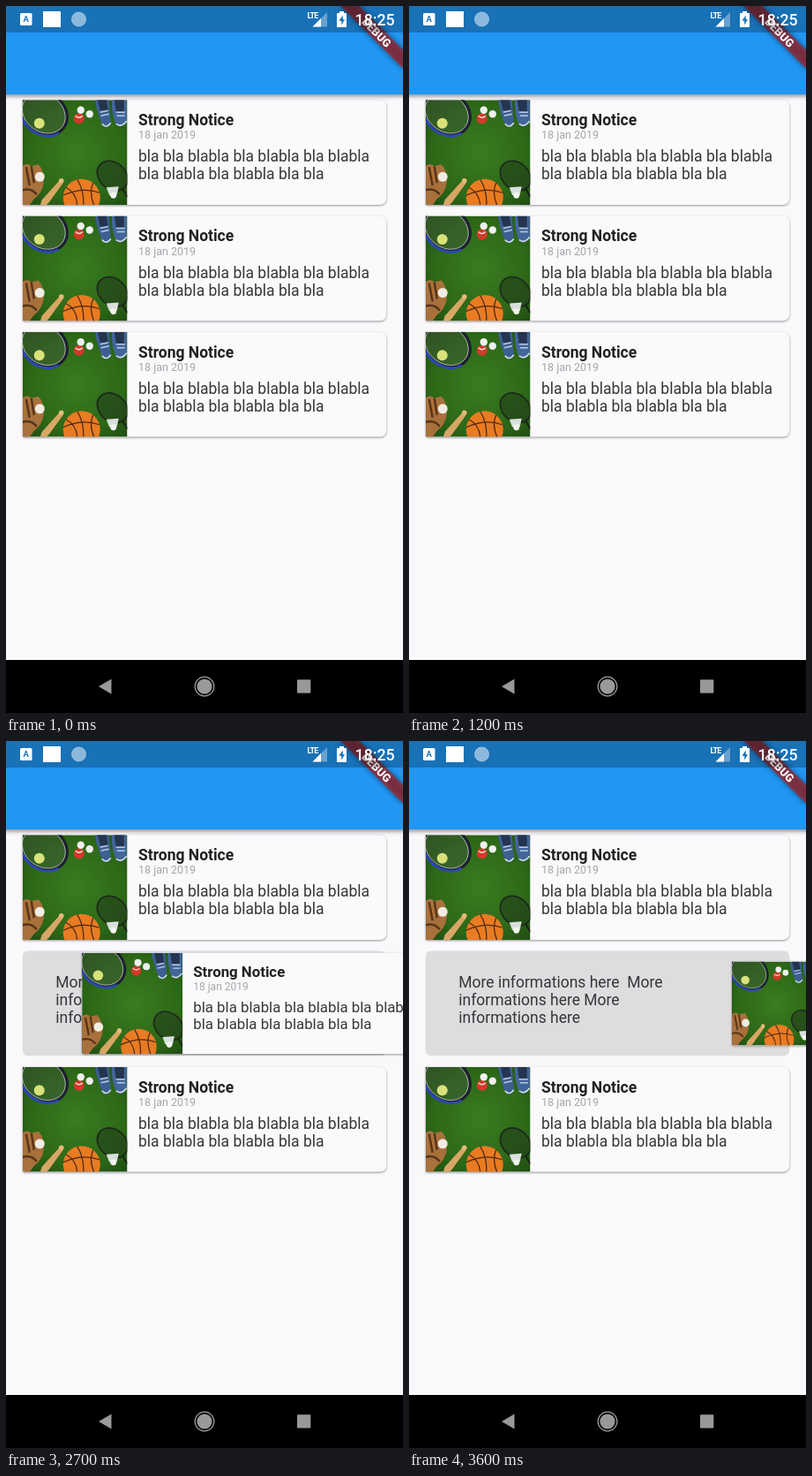
These frames come from a looping animation (450x800 px, 10 s). An HTML page:

```html
<!DOCTYPE html>
<html lang="en">
<head>
<meta charset="utf-8">
<title>Sliding notice cards</title>
<style>
  html, body { margin: 0; width: 100%; height: 100%; overflow: hidden; background: #faf8fb; }
  svg { display: block; width: 450px; height: 800px; font-family: Roboto, Arial, sans-serif; }
  text { white-space: pre; }
  .sheet { fill: #fbf9fc; filter: drop-shadow(0 1.5px 1.2px rgba(0, 0, 0, .42)); }
  .bar { fill: #2196f3; filter: drop-shadow(0 2px 2.5px rgba(0, 0, 0, .46)); }
  .ribbon { fill: #b71c1c; fill-opacity: .63; }
  .ribbon-shadow { filter: blur(3px); fill: #000; fill-opacity: .5; }
  .title { font-size: 17.5px; font-weight: 700; fill: #212122; }
  .date { font-size: 12.5px; fill: #a6a5a8; }
  .body { font-size: 17.5px; fill: #363538; }
</style>
</head>
<body>
<svg viewBox="0 0 450 800">
  <defs>
    <radialGradient id="grass" cx=".52" cy=".5" r=".75">
      <stop offset="0" stop-color="#397c20"/>
      <stop offset=".6" stop-color="#2d6817"/>
      <stop offset="1" stop-color="#1b4710"/>
    </radialGradient>
    <clipPath id="crop"><path d="M0 0H118.75V118.75H2Q0 118.75 0 116.75Z"/></clipPath>

    <g id="photo" clip-path="url(#crop)">
      <rect width="119" height="119" fill="url(#grass)"/>
      <!-- tennis racket and balls -->
      <g transform="translate(24 15) rotate(35)">
        <ellipse rx="28" ry="23" fill="#3c5a34" fill-opacity=".55" stroke="#1d2030" stroke-width="3.4"/>
        <path d="M27 9A28 23 0 0 1 -16 19" fill="none" stroke="#2b48b4" stroke-width="2.8"/>
        <ellipse rx="26" ry="21" fill="none" stroke="#c9ccd0" stroke-width=".7"/>
      </g>
      <circle cx="19" cy="26.5" r="6" fill="#d9e27a"/>
      <circle cx="64" cy="21" r="6" fill="#d33a28"/>
      <path d="M60 18Q64 22 68 18" fill="none" stroke="#f2ded6" stroke-width="1.3"/>
      <circle cx="66" cy="11.5" r="4.2" fill="#eef0ee"/>
      <circle cx="76" cy="16" r="4.2" fill="#eef0ee"/>
      <!-- shoes -->
      <path d="M82 0H98Q99 16 100 26Q98 32 92 30Q86 22 82 0Z" fill="#3d5f92"/>
      <path d="M101 0H118V24Q115 32 107 29Q101 20 101 0Z" fill="#42669b"/>
      <path d="M85 0H95L97 12H88ZM104 0H115V13H106Z" fill="#25344f"/>
      <path d="M88 14L97 12M89 18L98 16M106 14H116M107 18H116" stroke="#b9cbe2" stroke-width="1.4"/>
      <path d="M90 27Q95 33 100 26M106 27Q112 32 118 24" fill="none" stroke="#d4dde8" stroke-width="1.6"/>
      <!-- glove, ball and bat -->
      <path d="M0 75Q5 70 10 75L18 73Q25 80 24 94Q22 106 13 112L8 119H0Z" fill="#a8713b"/>
      <path d="M4 76L8 97M10 75L13 94M0 102Q10 99 16 107" fill="none" stroke="#56331a" stroke-width="2.4"/>
      <circle cx="19.5" cy="87" r="5.5" fill="#f1ece3"/>
      <path d="M42 91L46 94L30 116L27 119H20L22 113Z" fill="#d8a765"/>
      <circle cx="44" cy="91.5" r="2.8" fill="#e6bb7c"/>
      <!-- basketball -->
      <circle cx="67" cy="110.5" r="21" fill="#e97b22"/>
      <path d="M46 108Q68 98 87 105M62 90Q70 103 69 119M49 99Q61 105 62 119M80 94Q75 105 81 119" fill="none" stroke="#4d2a14" stroke-width="1.3"/>
      <!-- badminton racket and shuttlecock -->
      <ellipse cx="102" cy="86" rx="19" ry="15" transform="rotate(42 102 86)" fill="#243f1c" fill-opacity=".6" stroke="#1c2a1c" stroke-width="1.8"/>
      <path d="M113 100L119 110" stroke="#1b211b" stroke-width="2"/>
      <path d="M95 99L109 98L107 107Q103 112 98 107Z" fill="#d8dfdc"/>
      <circle cx="103" cy="108" r="3.4" fill="#f3f4ef"/>
    </g>

    <g id="card">
      <path class="sheet" d="M0 0H404.5Q412.5 0 412.5 8V110.75Q412.5 118.75 404.5 118.75H2Q0 118.75 0 116.75Z"/>
      <use href="#photo"/>
      <text class="title" x="131.25" y="28.75">Strong Notice</text>
      <text class="date" x="131.25" y="44">18 jan 2019</text>
      <text class="body" x="131.25" y="70">bla bla blabla bla blabla bla blabla</text>
      <text class="body" x="131.25" y="90">bla blabla bla blabla bla bla</text>
    </g>
  </defs>

  <rect width="450" height="800" fill="#faf8fb"/>

  <use href="#card" x="18.75" y="106.25"/>
  <use href="#card" x="18.75" y="368.75"/>
  <g id="details">
    <rect x="18.75" y="237.5" width="412.5" height="118.75" rx="6.25" fill="#dedcdf"/>
    <text class="body" x="56.25" y="278.6">More informations here  More</text>
    <text class="body" x="56.25" y="298.6">informations here More</text>
    <text class="body" x="56.25" y="318.6">informations here</text>
  </g>
  <use id="slider" href="#card"/>

  <rect class="bar" x="-10" y="-10" width="470" height="110"/>

  <g transform="translate(450 0) rotate(45)">
    <rect class="ribbon-shadow" x="-50" y="35" width="100" height="15"/>
    <rect class="ribbon" x="-50" y="35" width="100" height="15"/>
    <text y="46.9" font-size="12.75" font-weight="900" text-anchor="middle" fill="#fff">DEBUG</text>
  </g>

  <!-- status bar -->
  <rect width="450" height="30" fill="#000" fill-opacity=".25"/>
  <g fill="#fff">
    <rect x="16" y="8" width="13.5" height="14" rx="1.5"/>
    <text x="22.7" y="18" font-size="9.5" font-weight="700" text-anchor="middle" style="fill:#1971b6">A</text>
    <rect x="42" y="6" width="20" height="18"/>
    <circle cx="82.5" cy="15" r="8.3" fill-opacity=".5"/>
    <circle cx="82.5" cy="15" r="8" fill="none" stroke="#fff" stroke-opacity=".5" stroke-dasharray="1 1"/>
    <text x="341.5" y="13.6" font-size="9" font-weight="700" letter-spacing="-.9">LTE</text>
    <path d="M364 7V23.5H347.5Z" fill-opacity=".35"/>
    <path d="M357 14V23.5H347.5Z"/>
    <path d="M378 6H383V8H386V24H375V8H378Z"/>
    <path d="M381.8 10.5L377.4 16.8H380.2V21.5L384 15.2H381.8Z" fill="#1971b6"/>
    <text x="395.6" y="21.8" font-size="17.7" font-weight="500">18:25</text>
  </g>

  <!-- navigation bar -->
  <rect y="740" width="450" height="60" fill="#000"/>
  <g fill="#999">
    <path d="M105 770L119.5 761.5V778.5Z"/>
    <circle cx="225" cy="770" r="10.8" fill="none" stroke="#999" stroke-width="1.3"/>
    <circle cx="225" cy="770" r="8.6"/>
    <rect x="330" y="762.3" width="15.3" height="15.3" rx="1"/>
  </g>
</svg>

<script>
  const LOOP = 10000, START = 2700, STEP = 100, LAST = 9;
  const HOME = { x: 18.75, y: 237.5 }, HALF = { w: 206.25, h: 59.375 };
  const TRAVEL = 306, SHRINK = .2;
  const slider = document.getElementById("slider");
  const details = document.getElementById("details");

  // Share of the slide done; slows slightly towards the end.
  function progress(time) {
    if (time < START) return 0;
    const n = Math.min(LAST, Math.floor((time - START) / STEP));
    return Math.min(1, .194 + .1081 * n - .00206 * n * n);
  }

  function draw(now) {
    const p = progress(now % LOOP);
    const scale = 1 - SHRINK * p;
    const x = HOME.x + TRAVEL * p + HALF.w * (1 - scale);
    const y = HOME.y + HALF.h * (1 - scale);
    slider.setAttribute("transform", `translate(${x} ${y}) scale(${scale})`);
    details.setAttribute("visibility", p ? "visible" : "hidden");
  }

  const origin = performance.now();
  function tick() {
    draw(performance.now() - origin);
    requestAnimationFrame(tick);
  }
  tick();
</script>
</body>
</html>
```
